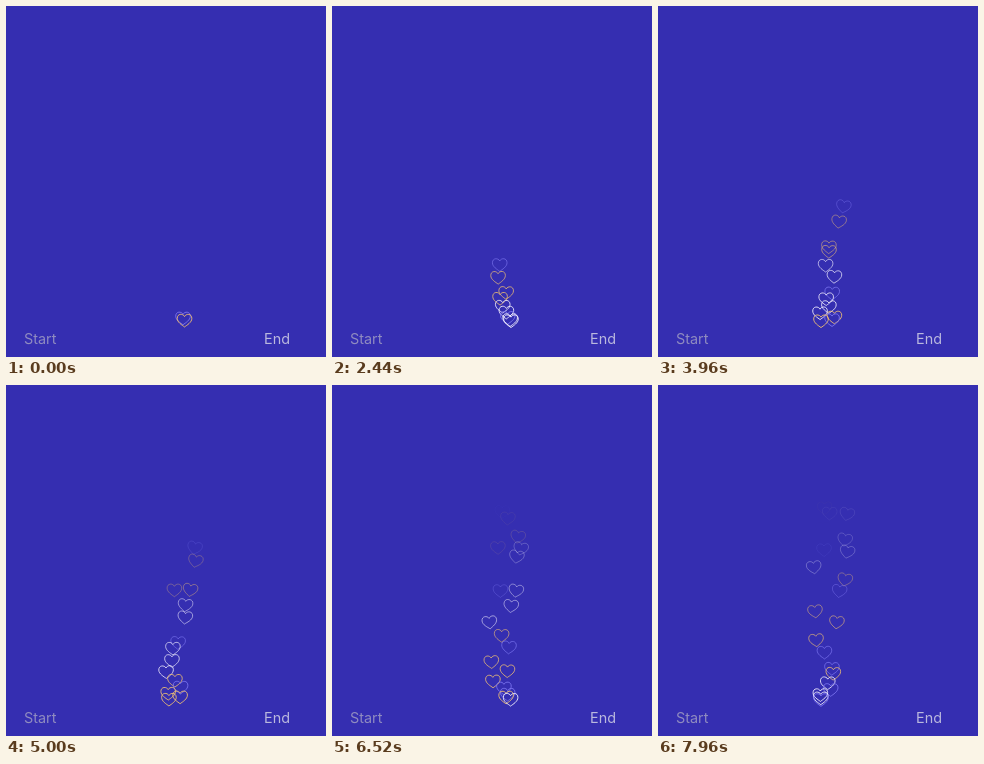
An HTML page with a canvas that plays this animation: 320x351 px, repeating every 8 s.

```html
<!DOCTYPE html>
<html lang="en">
<head>
<meta charset="utf-8">
<title>Floating hearts</title>
<style>
  html, body { margin: 0; width: 100%; height: 100%; overflow: hidden; background: #352eb1; }
  canvas { position: absolute; left: 0; top: 0; }
  span { position: absolute; top: 324px; font: 14.4px/18px Inter, Roboto, sans-serif; }
  #start { left: 18px; color: #8f8bc0; }
  #end { left: 258px; color: #bab8de; }
</style>
</head>
<body>
<canvas id="stage" width="320" height="351"></canvas>
<span id="start">Start</span>
<span id="end">End</span>
<script>
const LOOP = 8000, RISE = 8600, FLOOR = 315;
const FIRST_BIRTH = -735, INTERVAL = 385;
const ctx = document.getElementById('stage').getContext('2d');

const inks = { v: '#7f78f2', y: '#f3c272', w: '#f6f3ff' };
// Four ways up: climb height, and x at 0, 1/3, 2/3 and the whole of the climb
const lanes = {
  s: { height: 198, xs: [179, 170, 189, 160] }, // sway
  r: { height: 205, xs: [174, 178, 184, 191] }, // drift right
  g: { height: 174, xs: [176, 172, 168, 165] }, // glide across
  l: { height: 195, xs: [163, 158, 156, 152] }  // keep left
};
const inkOrder = 'vyyywwvwwwyvyyyvvywvwwv';
const laneOrder = 'ssgssrgsslsrlrlsgrsslll';

const clamp = v => Math.max(0, Math.min(1, v));

// cubic-bezier(.42, 0, .58, 1), solved by bisection
function easeInOut(p) {
  let low = 0, high = 1, u = 0.5;
  for (let i = 0; i < 20; i++) {
    u = (low + high) / 2;
    const x = 1.26 * u * (1 - u) ** 2 + 1.74 * u * u * (1 - u) + u ** 3;
    if (x < p) low = u; else high = u;
  }
  return u * u * (3 - 2 * u);
}

// cubic through four evenly spaced values
function curve(s, a, b, c, d) {
  const q = s - 1 / 3, r = s - 2 / 3, z = s - 1;
  return -4.5 * a * q * r * z + 13.5 * b * s * r * z - 13.5 * c * s * q * z + 4.5 * d * s * q * r;
}

const outline = new Path2D(
  'M0 -3.8C-1.5 -7 -7.3 -7 -7.3 -2C-7.3 2 -2.5 4.7 0 6.6C2.5 4.7 7.3 2 7.3 -2C7.3 -7 1.5 -7 0 -3.8Z');

function drawHeart(age, ink, { height, xs }) {
  if (age < 0 || age > RISE) return;
  const climb = easeInOut(age / RISE);
  const x = curve(climb, ...xs);
  ctx.save();
  ctx.translate(x, FLOOR - height * climb);
  ctx.rotate((x - 168) * 0.01 * clamp(climb * 3));
  ctx.globalAlpha = 1 - climb;
  ctx.strokeStyle = ink;
  ctx.lineWidth = 0.9;
  ctx.stroke(outline);
  ctx.restore();
}

function render() {
  const time = performance.now() % LOOP;
  ctx.clearRect(0, 0, 320, 351);
  for (let i = 0; i < laneOrder.length; i++) {
    const birth = FIRST_BIRTH + i * INTERVAL;
    drawHeart(time - birth, inks[inkOrder[i]], lanes[laneOrder[i]]);
  }
  requestAnimationFrame(render);
}
render();
</script>
</body>
</html>
```
